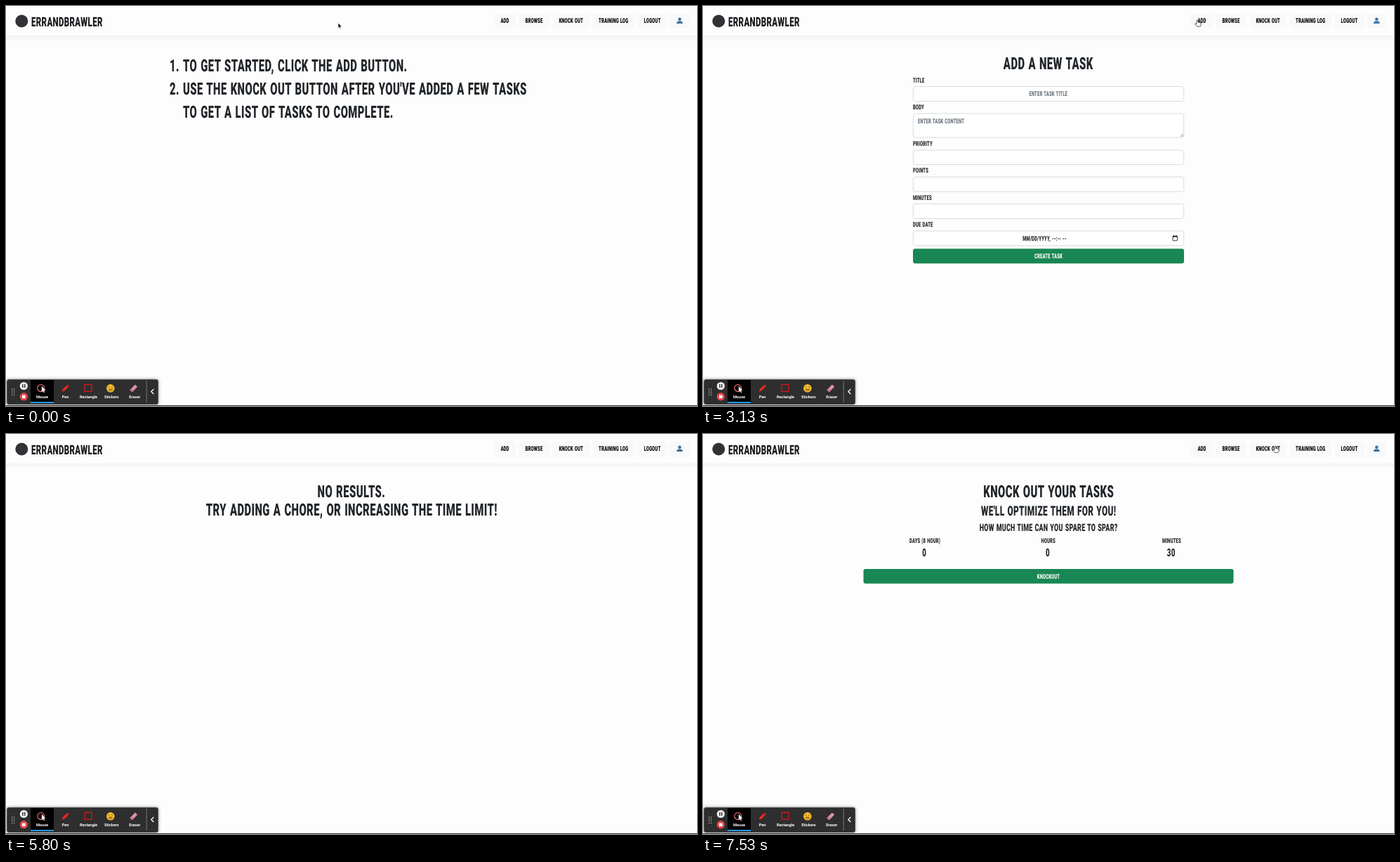
Write an HTML page that moves like this. It is 984 by 569 pixels and loops after 8 s.

```html
<!DOCTYPE html>
<html lang="en">
<head>
<meta charset="utf-8">
<title>Chore app walkthrough</title>
<style>
  html, body { margin: 0; width: 100%; height: 100%; overflow: hidden; background: #fdfdfd; }
  svg { display: block; width: 984px; height: 569px; text-rendering: geometricPrecision; }
  .head {
    font-family: Roboto, "Liberation Sans", sans-serif; font-weight: 900;
    letter-spacing: .03em; word-spacing: .06em;
  }
  .tip { font: 7.7px Inter, "Liberation Sans", sans-serif; fill: #fff; }
  .tool { font: 700 5.6px Roboto, "Open Sans", sans-serif; fill: #fff; }
</style>
</head>
<body>
<svg id="stage" viewBox="0 0 984 569">
  <defs>
    <linearGradient id="shade" x2="0" y2="1">
      <stop stop-color="#000" stop-opacity=".045"/>
      <stop offset="1" stop-color="#000" stop-opacity="0"/>
    </linearGradient>
    <filter id="soft" x="-10%" y="-30%" width="120%" height="160%">
      <feGaussianBlur stdDeviation="2"/>
    </filter>
  </defs>
  <rect width="984" height="569" fill="#fdfdfd"/>
</svg>
<script>
const LOOP = 8000;
const CONDENSE = 0.617; // one ratio for the whole condensed display face
const INK = '#212529', GREEN = '#198754', GREY = '#6c757d';
const stage = document.getElementById('stage');

function el(parent, name, attrs = {}, text) {
  const node = document.createElementNS('http://www.w3.org/2000/svg', name);
  for (const key in attrs) node.setAttribute(key, attrs[key]);
  if (text) node.textContent = text;
  return parent.appendChild(node);
}
const group = (parent = stage) => el(parent, 'g');
const path = (parent, d, attrs) => el(parent, 'path', { d, ...attrs });
const circle = (parent, cx, cy, r, fill) => el(parent, 'circle', { cx, cy, r, fill });
const box = (parent, x, y, x2, y2, attrs) =>
  el(parent, 'rect', { x, y, width: x2 - x, height: y2 - y, ...attrs });

// Display text, placed by the middle of its capitals
function head(parent, text, x, y, size, anchor = 'middle', fill = INK) {
  el(parent, 'text', {
    class: 'head', 'font-size': size, 'text-anchor': anchor, fill,
    transform: `translate(${x} ${y + size * 0.355}) scale(${CONDENSE} 1)`
  }, text);
}
const label = (parent, cls, text, x, y) =>
  el(parent, 'text', { class: cls, x, y, 'text-anchor': 'middle' }, text);

// Pages
const home = group(), form = group(), empty = group(), knock = group();

head(home, '1.', 247, 84.6, 24, 'end');
head(home, '2.', 247, 117.6, 24, 'end');
[
  'TO GET STARTED, CLICK THE ADD BUTTON.',
  "USE THE KNOCK OUT BUTTON AFTER YOU'VE ADDED A FEW TASKS",
  'TO GET A LIST OF TASKS TO COMPLETE.'
].forEach((line, i) => head(home, line, 252, 84.6 + 33 * i, 24, 'start'));

head(form, 'ADD A NEW TASK', 491.7, 81.6, 24);
[
  ['TITLE', 105.5, 114.5, 135.5], ['BODY', 144, 153, 187],
  ['PRIORITY', 195.7, 205, 225.5], ['POINTS', 234, 243.2, 264],
  ['MINUTES', 272.5, 281.5, 302.4], ['DUE DATE', 311, 320, 340.8]
].forEach(([name, y, top, bottom]) => {
  head(form, name, 299, y, 9.5, 'start');
  box(form, 299.3, top, 684.7, bottom, { rx: 3.2, fill: '#fff', stroke: '#d3d8dc', 'stroke-width': 0.9 });
});
head(form, 'ENTER TASK TITLE', 491.7, 125, 9.5, 'middle', GREY);
head(form, 'ENTER TASK CONTENT', 306, 163.3, 9.5, 'start', GREY);
head(form, 'MM/DD/YYYY, --:-- --', 486.5, 330.3, 9.5);
path(form, 'M679.5 186L684 181.5M682 186L684 184', { stroke: '#777', 'stroke-width': 0.7 });
box(form, 669, 327.3, 675.4, 333.8, { fill: 'none', stroke: '#222', 'stroke-width': 0.9, rx: 0.6 });
path(form, 'M669 328.2H675.4M670.4 326V328M674 326V328', { stroke: '#222', 'stroke-width': 1.2 });
box(form, 299, 345.2, 685, 366.2, { rx: 3.2, fill: GREEN });
head(form, 'CREATE TASK', 492, 355.5, 9.5, 'middle', '#fff');

head(empty, 'NO RESULTS.', 491.9, 81.6, 24);
head(empty, 'TRY ADDING A CHORE, OR INCREASING THE TIME LIMIT!', 492.2, 107.8, 24);

head(knock, 'KNOCK OUT YOUR TASKS', 492.2, 81.6, 24);
head(knock, "WE'LL OPTIMIZE THEM FOR YOU!", 492.2, 109.6, 19.2);
head(knock, 'HOW MUCH TIME CAN YOU SPARE TO SPAR?', 492.2, 132.4, 14.4);
[['DAYS (8 HOUR)', '0', 316], ['HOURS', '0', 491.7], ['MINUTES', '30', 667.5]].forEach(([name, value, x]) => {
  head(knock, name, x, 151.6, 9.5);
  head(knock, value, x - 0.8, 168.3, 15.5);
});
box(knock, 228.5, 192, 755.5, 212.8, { rx: 3.2, fill: GREEN });
head(knock, 'KNOCKOUT', 492, 202.3, 9.5, 'middle', '#fff');

// Top bar
box(stage, 0, 42, 984, 50, { fill: 'url(#shade)' });
circle(stage, 22.3, 21.5, 9, '#303235');
head(stage, 'ERRANDBRAWLER', 36, 22.1, 18.6, 'start', '#17191c');
const buttons = [
  ['ADD', 695, 726], ['BROWSE', 730, 774], ['KNOCK OUT', 778.3, 831],
  ['TRAINING LOG', 835.3, 895], ['LOGOUT', 899.3, 941.5], ['', 946, 973]
].map(([name, x, x2]) => {
  const rect = box(stage, x, 10.5, x2, 31.5, { rx: 3.2, fill: '#f8f9fa' });
  if (name) head(stage, name, (x + x2) / 2, 20.8, 9.5, 'middle', '#000');
  return rect;
});
circle(stage, 959.3, 18.7, 2.3, '#3d739f');
path(stage, 'M954.9 25Q955 22 958 21.6H960.6Q963.6 22 963.7 25Z', { fill: '#3d739f' });

// Tooltips
const tips = [
  [710.3, 684, 737, ['Add a chore.']],
  [752, 714.3, 789.6, ['Browse your tasks.']],
  [804.6, 749.8, 859.5, ['Maximize your chore', 'achievement.']]
].map(([x, left, right, lines]) => {
  const tip = group();
  path(tip, `M${x - 3.3} 39.2L${x} 36L${x + 3.3} 39.2Z`, { fill: '#141414' });
  box(tip, left, 38.8, right, 42.9 + 11.5 * lines.length, { rx: 3, fill: '#141414' });
  lines.forEach((line, i) => label(tip, 'tip', line, x, 49.3 + i * 11.5));
  return tip;
});

// Recorder toolbar
box(stage, 0, 568, 984, 569, { fill: '#303030' });
box(stage, 1, 531, 217, 567, { rx: 3, fill: '#000', opacity: 0.45, filter: 'url(#soft)' });
box(stage, 1.5, 531.5, 216.5, 566.5, { rx: 2.5, fill: '#2e2e2e', stroke: '#4a4a4a', 'stroke-width': 0.8 });
box(stage, 35, 532, 68, 565, { fill: '#000' });
box(stage, 35, 563, 68, 565, { fill: '#2196f3' });
for (let i = 0; i < 8; i++) circle(stage, 8.6 + (i % 2) * 3, 545 + (i >> 1) * 2.8, 0.75, '#bbb');
circle(stage, 25.3, 540.5, 5.6, '#f2f2f2');
path(stage, 'M23.9 538V543M26.7 538V543', { stroke: '#222', 'stroke-width': 1.4 });
circle(stage, 25.3, 555.7, 5.6, '#e5484d');
box(stage, 23, 553.4, 27.6, 558, { rx: 0.6, fill: '#fff' });
el(stage, 'circle', { cx: 49.7, cy: 543.6, r: 4.9, fill: 'none', stroke: '#e8696b', 'stroke-width': 1.3 });
path(stage, 'M50.8 540.8V549L52.6 547.4L53.9 550L55.2 549.4L54 546.8H56.4Z', { fill: '#fff' });
path(stage, 'M79.8 548.7L80.8 545.2L86.2 539.8L88.6 542.2L83.2 547.6Z', { fill: '#f0281f' });
path(stage, 'M86.8 539.2L87.8 538.2L90.2 540.6L89.2 541.6Z', { fill: '#f0281f' });
box(stage, 112, 538.4, 122, 548.3, { fill: 'none', stroke: '#d9151b', 'stroke-width': 1.3 });
circle(stage, 148.8, 543.8, 5.8, '#f5bd2f');
path(stage, 'M145.6 542.4L147.4 541.8M150.2 541.8L152 542.4M146 545.6Q149 544.2 151.8 545.6Q149 549 146 545.6',
  { fill: 'none', stroke: '#7a3d10', 'stroke-width': 0.9 });
path(stage, 'M176.4 546.2L183.8 538.6L187.2 541.6L179.8 549.2Z', { fill: '#dd93a6' });
path(stage, 'M176.4 546.2L178.8 543.7L182.2 546.7L179.8 549.2Z', { fill: '#c9788d' });
[['Mouse', 51.5], ['Pen', 84.5], ['Rectangle', 117.5], ['Stickers', 150.3], ['Eraser', 183.2]]
  .forEach(([name, x]) => label(stage, 'tool', name, x, 557.8));
box(stage, 199.7, 533, 200.7, 564, { fill: '#777' });
path(stage, 'M210.3 545L206.8 548.5L210.3 552', { fill: 'none', stroke: '#fff', 'stroke-width': 1.3 });

// Pointer, drawn with its tip at 0,0
const ring = el(stage, 'circle', { fill: '#e88', 'fill-opacity': 0.1, stroke: '#ec7f7b', 'stroke-width': 2 });
const pointer = group();
const arrow = path(pointer, 'M0 0V7.4L1.7 5.9L2.9 8.4L4.1 7.9L3 5.4H5.2Z',
  { fill: '#111', stroke: '#fff', 'stroke-width': 0.6 });
const hand = path(pointer,
  'M-1 1Q0 -.5 1 1V3.8Q2.2 3.2 2.8 4.2Q4 3.6 4.3 4.7Q5.4 4.5 5.4 5.6Q5.4 7.8 4.2 9.6H-.4L-3.5 6.2Q-3.3 4.5 -1 6.1Z',
  { fill: '#fff', stroke: '#333', 'stroke-width': 0.8 });

// Timing
const pages = [[home, 0], [form, 3130], [empty, 5060], [knock, 7260]];
const hovers = [ // from, fade, click, until
  [2350, 150, 2670, 3130],
  [4590, 1, 4600, 5060],
  [6370, 150, 6800, 7260]
];
const track = [ // time, x, y
  [60, 473, 24], [400, 500, 34], [1460, 500, 34], [2260, 699, 34], [2400, 704, 19.5],
  [3530, 704, 19.5], [4130, 753.3, 18.2], [6330, 753.3, 18.2], [6460, 814.8, 16.8]
];
const clamp = v => Math.max(0, Math.min(1, v));
const smooth = v => v * v * (3 - 2 * v);
const mix = (a, b, k) => a + (b - a) * k;
const show = (node, on) => node.setAttribute('visibility', on ? 'visible' : 'hidden');

function pointerAt(t) {
  const next = track.findIndex(step => step[0] > t);
  if (next < 1) return (next ? track[track.length - 1] : track[0]).slice(1);
  const a = track[next - 1], b = track[next];
  const k = smooth((t - a[0]) / (b[0] - a[0]));
  return [mix(a[1], b[1], k), mix(a[2], b[2], k)];
}

function draw(t) {
  pages.forEach(([page, from], i) => {
    const until = i + 1 < pages.length ? pages[i + 1][1] : LOOP;
    show(page, t >= from && t < until);
  });

  const [x, y] = pointerAt(t);
  let glow = 0, radius = 17.5;
  hovers.forEach(([from, fade, click, until], i) => {
    const k = t < until ? clamp((t - from) / fade) : 0;
    const since = t - click;
    const down = since >= 0 && since < 260;
    const shade = Math.round(mix(249, down ? 200 : 213, k));
    buttons[i].setAttribute('fill', `rgb(${shade - 1},${shade},${shade + 1})`);
    tips[i].setAttribute('opacity', k);
    if (down) {
      const out = clamp((since - 70) / 190);
      glow = 1 - out;
      radius = 17.5 - 4 * out;
    }
  });

  ring.setAttribute('cx', x);
  ring.setAttribute('cy', y);
  ring.setAttribute('r', radius);
  ring.setAttribute('opacity', glow);
  pointer.setAttribute('transform', `translate(${x} ${y})`);
  const away = t >= 5800 && t < 5930;
  const pointing = t >= 2330;
  show(arrow, !pointing);
  show(hand, pointing && !away);
}

const start = performance.now();
function frame() {
  draw((performance.now() - start) % LOOP);
  requestAnimationFrame(frame);
}
frame();
</script>
</body>
</html>
```
